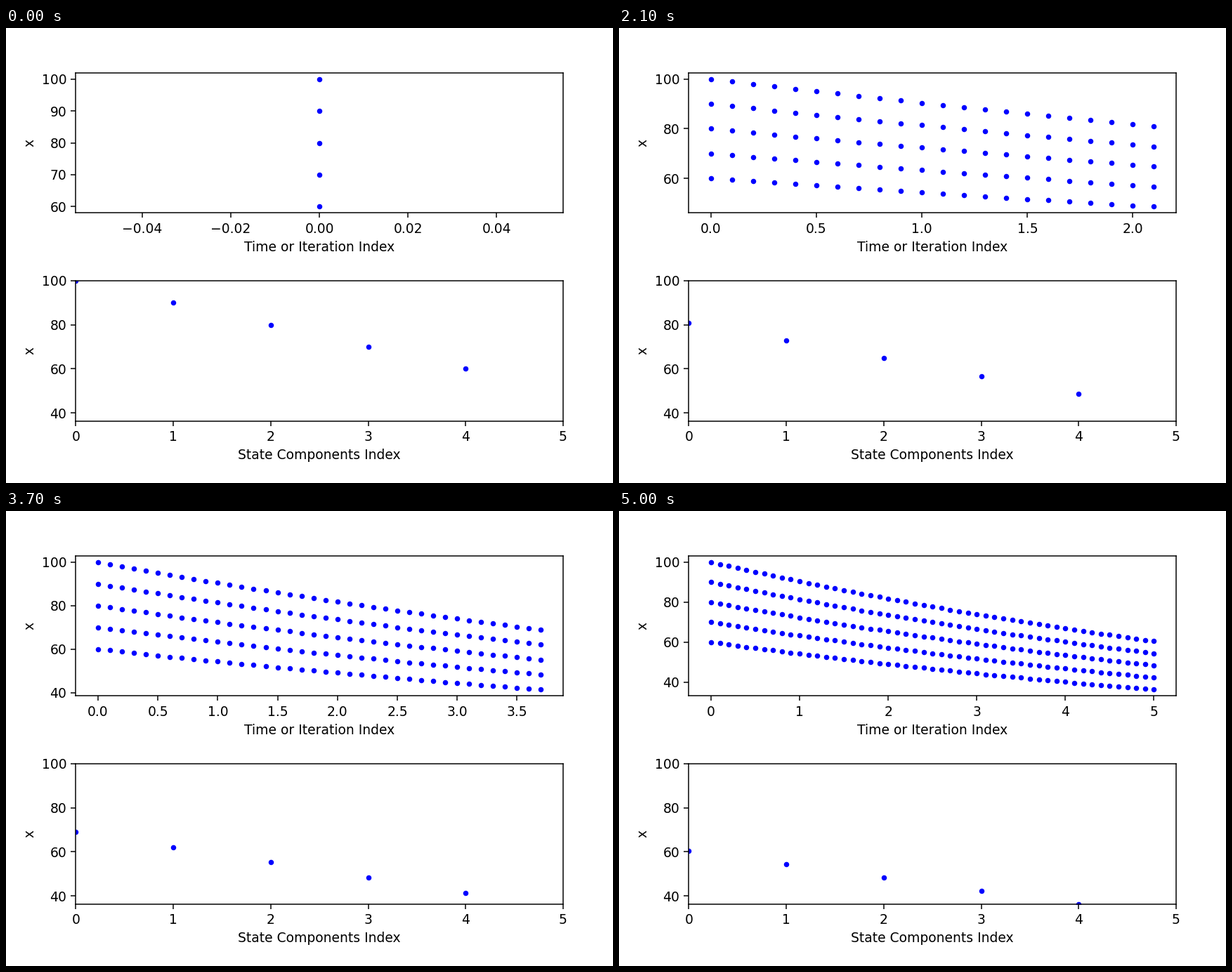
Write a matplotlib script that moves like this. It is 864 px wide and 648 px high and loops after 5.1 s.

```python
import numpy as np
import matplotlib.pyplot as plt
from matplotlib.animation import FuncAnimation

W, H, DPI = 864, 648, 135
FRAMES, INTERVAL = 51, 100
STEP, DECAY = 0.1, 0.1

# Explicit Euler solution of x' = -DECAY * x for five start values
start = np.arange(100, 59, -10)
times = STEP * np.arange(FRAMES)
states = start * (1 - DECAY * STEP) ** np.arange(FRAMES)[:, None]

plt.rcParams["font.family"] = "DejaVu Sans"
fig = plt.figure(figsize=(W / DPI, H / DPI), dpi=DPI)


def add_panel(top, xlabel):
    left, width, height = 99.4, 693.6, 199.7
    ax = fig.add_axes([left / W, 1 - (top + height) / H, width / W, height / H])
    ax.set_xlabel(xlabel)
    ax.set_ylabel("x")
    line, = ax.plot([], [], "b.")
    return ax, line


history_ax, history = add_panel(63.7, "Time or Iteration Index")
state_ax, current = add_panel(359.9, "State Components Index")
state_ax.set_xlim(0, len(start))
state_ax.set_ylim(states.min(), states.max())


def update(i):
    shown = states[:i + 1]
    history.set_data(np.repeat(times[:i + 1], len(start)), shown.ravel())
    history_ax.relim()
    history_ax.autoscale_view()
    current.set_data(np.arange(len(start)), states[i])
    return history, current


anim = FuncAnimation(fig, update, frames=FRAMES, interval=INTERVAL,
                     repeat=True, repeat_delay=0, blit=False)
plt.show()
```
